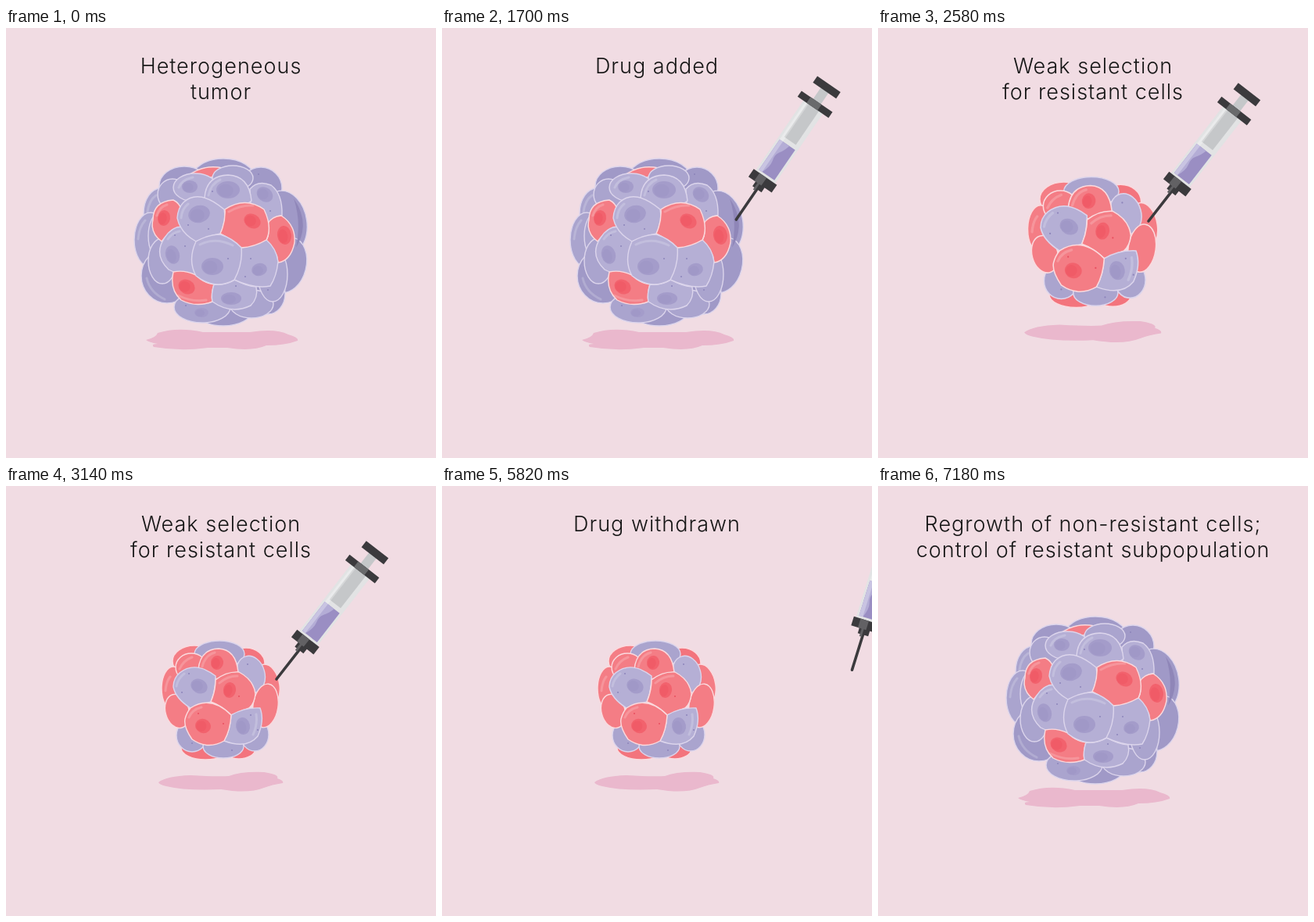
Write an HTML page that moves like this. It is 550 px wide and 550 px high and loops after 8 s.

```html
<!DOCTYPE html>
<html lang="en">
<head>
<meta charset="utf-8">
<title>Tumor treatment cycle</title>
<style>
  html, body { margin: 0; width: 100%; height: 100%; overflow: hidden; background: #f1dce3; }
  svg { display: block; width: 100%; height: 100%; }
  text { font: 300 27px Inter, "Open Sans", sans-serif; letter-spacing: 1px; fill: #161616; text-anchor: middle; }
  .shadow { fill: #eab8cd; }
  .cell { stroke: #dcd5ec; stroke-width: 1.4; stroke-linejoin: round; }
  .cell.red { stroke: #fbdade; }
  .shine { fill: none; stroke: #fff; stroke-opacity: .18; stroke-width: 3; stroke-linecap: round; }
</style>
</head>
<body>
<svg viewBox="0 0 550 550">
  <g id="big"></g>
  <g id="small"></g>
  <g id="syringe">
    <path d="M0 0V-50" stroke="#3b3a3d" stroke-width="3.6" stroke-linecap="round"/>
    <rect x="-6" y="-201" width="12" height="22" fill="#c5c7c9"/>
    <rect x="-15" y="-176" width="30" height="112" fill="#e2e3e4"/>
    <rect x="-9" y="-176" width="18" height="54" fill="#c5c7c9"/>
    <rect x="-12" y="-116" width="24" height="47" fill="#9a8ec3"/>
    <path d="M-12 -116H3Q1 -107 -3 -102Q-7 -96 -4 -88Q-2 -80 -7 -69H-12Z" fill="#b4add6"/>
    <rect x="-12" y="-176" width="5" height="107" fill="#fff" opacity=".28"/>
    <rect x="-18" y="-66" width="36" height="12" fill="#3b3a3d"/>
    <rect x="-7" y="-55" width="14" height="8" fill="#3b3a3d"/>
    <path d="M-9 -66H2V-54H-1V-44H-4V-54H-9Z" fill="#626164"/>
    <rect x="-24" y="-183" width="48" height="9" fill="#3b3a3d"/>
    <rect x="-10" y="-183" width="17" height="9" fill="#696a6c"/>
    <rect x="-18" y="-210" width="36" height="10" fill="#3b3a3d"/>
  </g>
  <g id="caption"></g>
</svg>
<script>
const $ = id => document.getElementById(id);
const LOOP = 8000, MID = 274.5, MIN = 0.68;
const tone = { dark: '#a099c7', mid: '#aaa4ce', light: '#b5afd5', red: '#f47d85', deep: '#f3747d' };
const isRed = t => t === 'red' || t === 'deep';
const cls = t => 'cell' + (isRed(t) ? ' red' : '');

const oval = (t, x, y, rx, ry, turn = 0) =>
  `<ellipse class="${cls(t)}" fill="${tone[t]}" cx="${x}" cy="${y}" rx="${rx}" ry="${ry}" transform="rotate(${turn} ${x} ${y})"/>`;

const nucleus = (t, x, y, rx, ry, turn = 0) =>
  `<g transform="translate(${x} ${y}) rotate(${turn})">` +
  `<ellipse fill="${isRed(t) ? '#f2626d' : '#a49cca'}" rx="${rx}" ry="${ry}"/>` +
  `<ellipse fill="${isRed(t) ? '#f05b67' : '#a098c7'}" cx="${-rx * .2}" cy="${ry * .1}" rx="${rx * .65}" ry="${ry * .75}"/></g>`;

// A front cell: outline plus nucleus
const cell = (t, d, ...core) =>
  `<path class="${cls(t)}" fill="${tone[t]}" d="${d}"/>` + nucleus(t, ...core);

const shine = d => `<path class="shine" d="${d}"/>`;
const dot = (x, y, c = '#8d84ba') => `<circle cx="${x}" cy="${y}" r="1" fill="${c}"/>`;
const shadow = d => `<path class="shadow" d="${d}"/>`;

$('big').innerHTML = [
  shadow('M179 399Q192 396 194 390Q220 382 252 389L312 389Q345 384 361 392Q375 396 373 400Q357 406 333 406Q315 414 283 409L258 409Q225 414 189 408Q185 404 194 404Q183 402 179 399Z'),
  oval('dark', 278, 192, 40, 25),
  oval('dark', 326, 205, 27, 27),
  oval('dark', 228, 202, 32, 25),
  oval('dark', 355, 250, 30, 42, -8),
  oval('dark', 359, 303, 25, 36, 14),
  oval('mid', 198, 237, 22, 32),
  oval('mid', 185, 271, 21, 35),
  oval('dark', 206, 317, 33, 35),
  oval('dark', 278, 361, 37, 20),
  oval('dark', 335, 340, 22, 26),
  oval('mid', 314, 353, 28, 18),
  oval('mid', 251, 357, 36, 20),
  nucleus('dark', 250, 364, 9, 6),
  shine('M180 320Q184 338 203 347M169 270Q170 255 178 246M181 235Q183 220 192 214'),
  `<path d="M368 218Q390 250 371 281Q378 248 368 218Z" fill="#8f86b8"/>`,
  oval('mid', 213, 213, 19, 20),
  oval('mid', 197, 266, 15, 30),
  oval('mid', 200, 298, 18, 29),
  oval('mid', 341, 315, 19, 35),
  cell('red', 'M233 189Q252 174 277 179L264 191Z', 250, 185, 0, 0),
  oval('mid', 290, 192, 26, 16),
  oval('light', 242, 204, 28, 18),
  nucleus('light', 235, 203, 10, 8),
  cell('light', 'M312 206Q322 194 339 201Q354 212 353 240Q344 240 338 249Q325 238 313 225Z', 331, 213, 11, 9, 38),
  cell('light', 'M254 217Q256 189 284 188Q311 189 314 221Q308 226 302 226Q288 228 279 236Q264 224 254 217Z', 284, 207, 15, 11),
  cell('red', 'M188 245Q188 222 214 220Q222 224 224 232Q219 246 224 255Q206 263 199 273Q184 262 188 245Z', 202, 243, 8, 10, 10),
  cell('red', 'M335 250Q340 241 352 240Q371 252 369 275Q364 298 348 300Q347 285 333 272Q338 262 335 250Z', 356, 265, 9, 12, -8),
  cell('light', 'M203 268Q214 251 230 255Q238 268 244 272Q234 295 244 316Q222 317 208 309Q188 290 203 268Z', 213, 290, 9, 12, -15),
  cell('red', 'M214 312Q228 309 243 316Q252 326 266 328Q262 342 264 350Q243 358 224 348Q209 335 214 312Z', 231, 331, 11, 9, 28),
  cell('light', 'M266 328Q280 330 293 322Q306 330 320 331Q323 345 313 355Q288 367 264 350Q262 340 266 328Z', 288, 346, 13, 8),
  cell('light', 'M301 281Q318 279 333 271Q346 282 348 299Q346 318 338 330Q318 334 292 322Q302 300 301 281Z', 324, 309, 10, 8, -15),
  cell('light', 'M227 223Q247 205 279 232Q282 248 274 263Q260 266 243 273Q223 262 219 243Q220 230 227 223Z', 247, 238, 14, 11, -15),
  cell('red', 'M280 232Q306 215 330 232Q341 255 333 271Q318 280 301 281Q288 270 274 263Q281 248 280 232Z', 315, 247, 11, 9, 30),
  cell('light', 'M243 273Q259 264 274 264Q290 269 301 281Q303 302 292 322Q268 336 243 317Q232 297 243 273Z', 264, 305, 14, 11),
  shine('M224 243Q225 231 233 225M248 277Q268 267 290 278M285 235Q300 226 316 227M193 240Q196 229 206 226M207 270Q212 262 222 260M221 204Q225 194 239 191'),
  shine('M220 342Q238 351 256 348M259 214Q262 199 274 194'),
  dot(259, 257), dot(233, 252), dot(306, 318), dot(335, 335), dot(294, 330), dot(229, 279), dot(284, 295),
  dot(264, 209), dot(338, 234), dot(216, 265), dot(313, 295), dot(230, 355), dot(323, 187)
].join('');

$('small').innerHTML = [
  shadow('M195 379Q205 371 236 370Q270 372 285 371Q300 365 330 366Q350 369 347 374Q356 377 354 380Q340 382 330 386Q310 394 275 388Q230 390 205 384Q196 382 195 379Z'),
  oval('red', 241, 224, 28, 20),
  oval('deep', 307, 227, 24, 20),
  oval('red', 333, 256, 17, 28, -8),
  oval('red', 214, 259, 15, 28),
  oval('deep', 255, 335, 31, 15),
  oval('deep', 298, 336, 21, 13),
  oval('mid', 238, 319, 20, 21),
  oval('mid', 318, 318, 18, 21),
  oval('mid', 273, 215, 32, 17),
  oval('red', 237, 232, 20, 18),
  oval('light', 313, 241, 18, 24, -15),
  oval('red', 332, 281, 16, 28, 8),
  oval('red', 219, 288, 15, 22, -15),
  oval('mid', 278, 333, 26, 15),
  cell('red', 'M246 235Q248 209 272 208Q294 209 297 238Q284 240 269 247Q258 236 246 235Z', 270, 226, 8, 9, 8),
  cell('light', 'M222 239Q242 223 268 243Q268 262 262 276Q247 281 236 284Q217 272 214 257Q214 246 222 239Z', 247, 256, 11, 9, 28),
  cell('red', 'M268 248Q282 237 298 238Q317 248 319 266Q318 278 311 284Q300 288 288 293Q276 281 262 276Q268 262 268 248Z', 286, 261, 8, 10, 10),
  cell('light', 'M288 293Q305 283 325 284Q331 300 322 320Q308 337 279 326Q287 312 288 293Z', 303, 307, 9, 11, -10),
  cell('red', 'M236 284Q262 267 288 293Q287 312 279 326Q258 338 238 324Q227 308 229 298Q231 290 236 284Z', 252, 307, 10, 9, 20),
  shine('M218 256Q220 246 228 240M234 296Q238 286 250 283M273 252Q283 243 296 243M251 231Q255 216 267 213M320 292Q322 305 316 318M222 234Q227 223 238 219M204 262Q205 250 210 244'),
  dot(234, 240), dot(225, 264), dot(313, 293), dot(322, 312), dot(289, 338), dot(238, 329), dot(309, 228),
  dot(298, 269, '#e84f5f'), dot(278, 304, '#e84f5f'), dot(246, 291, '#e84f5f')
].join('');

// Captions: [start, end, lines]
const captions = [
  [0, 500, ['Heterogeneous', 'tumor']],
  [1060, 1940, ['Drug added']],
  [2500, 4900, ['Weak selection', 'for resistant cells']],
  [5460, 6000, ['Drug withdrawn']],
  [6560, LOOP, ['Regrowth of non-resistant cells;', 'control of resistant subpopulation']]
];
$('caption').innerHTML = captions.map(c =>
  '<g>' + c[2].map((s, i) => `<text x="275" y="${58 + i * 33}">${s}</text>`).join('') + '</g>').join('');
const labels = [...$('caption').children];

const clamp = v => Math.max(0, Math.min(1, v));
const easeOut = (t, start, span, power) => 1 - (1 - clamp((t - start) / span)) ** power;

function place(id, scale, opacity) {
  const g = $(id);
  g.setAttribute('transform', `translate(${MID} ${MID}) scale(${scale}) translate(${-MID} ${-MID})`);
  g.setAttribute('opacity', opacity);
  g.style.display = opacity > 0 ? '' : 'none';
}

function draw(t) {
  const shrunk = easeOut(t, 2110, 870, 2) - easeOut(t, 6220, 960, 2);
  const size = 1 - (1 - MIN) * shrunk;
  const mix = (0.79 - size) / 0.04;
  place('big', size, clamp(2 - 2 * mix));
  place('small', size / MIN, clamp(2 * mix));

  const away = 1.27 * (1 - easeOut(t, 1320, 800, 3) + easeOut(t, 5440, 820, 3));
  $('syringe').setAttribute('transform',
    `translate(${346 + 166 * away} ${247 - 11 * away}) rotate(${37.9 - 19.2 * away})`);
  $('syringe').style.display = t >= 1340 && t < 6260 ? '' : 'none';

  captions.forEach(([from, to], i) => {
    labels[i].style.display = t >= from && t < to ? '' : 'none';
  });
}

const begin = performance.now();
function tick() {
  draw((performance.now() - begin) % LOOP);
  requestAnimationFrame(tick);
}
tick();
</script>
</body>
</html>
```
